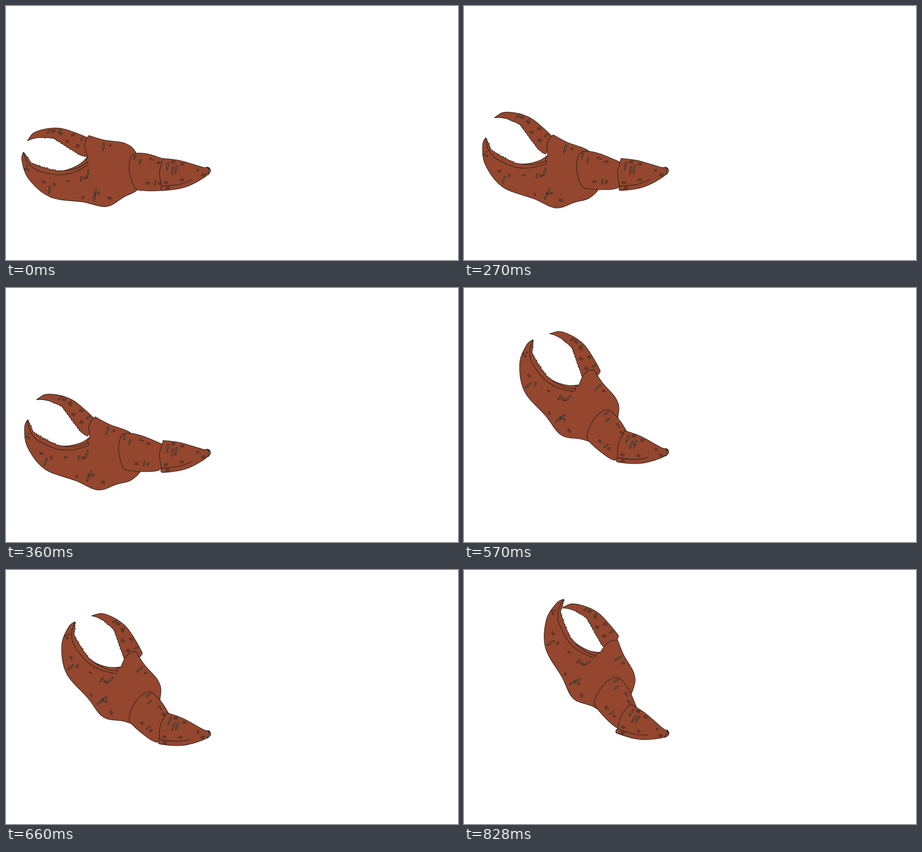
These frames come from a looping animation (998x561 px, 900 ms). An HTML page:

```html
<!DOCTYPE html>
<html lang="en">
<head>
<meta charset="utf-8">
<title>Crab claw</title>
<style>
  html, body { margin: 0; width: 100%; height: 100%; overflow: hidden; background: #fff; }
  svg { display: block; width: 100%; height: 100%; }
  path { fill: none; stroke: #20201c; stroke-width: 1.15; stroke-linejoin: round; stroke-linecap: round; }
  .shell { fill: #94462e; }
  .scar { fill: #8d6a52; }
</style>
</head>
<body>
<svg id="stage" viewBox="0 0 998 561"></svg>
<script>
const LOOP = 900, FIRST_HOLD = 120, HOLD = 150, LAST_POSE = 5;
const FOREARM_TIP = { x: 451.5, y: 364 };

const stage = document.getElementById('stage');
const points = text => text.split(' ').map(p => p.split(',').map(Number));

let seed = 7;
const random = () => (seed = seed * 16807 % 2147483647) / 2147483647;

// Smooth curve through key points; begins with "M" or joins on with "L".
function curve(text, start = 'M') {
  const p = points(text);
  let d = start + p[0];
  for (let i = 0; i < p.length - 1; i++) {
    const [a, b, c, e] = [p[i - 1] || p[i], p[i], p[i + 1], p[i + 2] || p[i + 1]];
    const near = b.map((v, k) => v + (c[k] - a[k]) / 6);
    const far = c.map((v, k) => v - (e[k] - b[k]) / 6);
    d += `C${near} ${far} ${c}`;
  }
  return d;
}
const join = text => curve(text, 'L');

// Saw edge along the key points: each tooth rises slowly and drops steeply.
function teeth(text, perSpan, size) {
  const p = points(text);
  let d = '';
  for (let i = 0; i < p.length - 1; i++) {
    const [[x1, y1], [x2, y2]] = [p[i], p[i + 1]];
    const length = Math.hypot(x2 - x1, y2 - y1);
    for (let k = 0; k < perSpan; k++) {
      const at = k / perSpan, top = at + 0.75 / perSpan, bite = size * (0.4 + random());
      const nx = (y2 - y1) / length * bite, ny = (x1 - x2) / length * bite;
      d += `L${x1 + (x2 - x1) * at} ${y1 + (y2 - y1) * at}` +
        `L${x1 + (x2 - x1) * top + nx} ${y1 + (y2 - y1) * top + ny}`;
    }
  }
  return d;
}

// Teardrop scars, all leaning by dx, dy.
function scars(text, dx, dy) {
  return points(text).map(([x, y]) => {
    const length = Math.hypot(dx, dy), nx = -dy / length * 3, ny = dx / length * 3;
    return `M${x} ${y}c${nx} ${ny} ${dx + nx / 3} ${dy + ny / 3} ${dx} ${dy}` +
      `C${x + dx - nx / 4} ${y + dy - ny / 4} ${x - nx} ${y - ny} ${x} ${y}Z`;
  }).join('');
}
// Little rows of two to four strokes, centred on each point.
function ticks(text, lean) {
  return points(text).map(([x, y]) => {
    const count = 2 + Math.round(random() * 1.6), half = 2 + random() * 1.5;
    let d = '';
    for (let i = 0; i < count; i++) {
      d += `M${x + (i - (count - 1) / 2) * 3 + lean} ${y - half}l${-2 * lean} ${2 * half}`;
    }
    return d;
  }).join('');
}
const rings = (text, r) => points(text).map(([x, y]) =>
  `M${x - r} ${y}a${r} ${r} 0 1 0 ${2 * r} 0a${r} ${r} 0 1 0 ${-2 * r} 0Z`).join('');

// Parts are drawn at rest, back to front. A pose is the place of the anchor and a turn in degrees.
const finger = {
  anchor: [120.7, 292.7],
  poses: '120.7,292.7,0 122.5,286.8,5.8 138,268,20.9 190.2,194,24 250.5,142.3,38 284.2,113.7,28',
  shell: curve('47,298 60,281 80,273 104,269.5 130,272 178,290 187,300 181,333') +
    teeth('181,333 164,329 140,314 114,297 104,291 77,290', 4, 1.4) + join('77,290 60,293 47,298'),
  scars: scars('97,273 121,274 170,290', -5, 8),
  lines: ticks('104,276 122,282 135,299 148,285 158,309', 0.8)
};
const palm = {
  anchor: [160.2, 363.4],
  poses: '160.2,363.4,0 158,371,5.9 159,355.6,11.8 185.4,274.6,24.5 219,224.2,40.4 264.6,185.2,51.7',
  shell: curve('180,333 174,312 176,296 183,286') +
    join('183,286 217,296 262,303 286,322 308,370 291,405 260,422 222,443 170,433 98,422 50,382 35,341 38,323') +
    teeth('38,323 55,347 80,357 110,364', 5, 2.2) + join('110,364 134,362 163,349 180,333'),
  scars: scars('216,302 182,362 97,397 199,403 196,412', -2, 18) +
    rings('166,379 166,385 43,360 49,362', 1.8),
  lines: curve('38,323 47,344 65,361 94,370 122,373 151,367 181,352') +
    curve('131,364 160,357 180,345') + 'M180 333L177 342L182 350' + rings('135,387 139,386 46,353', 0.9) +
    ticks('83,389 106,394 170,423 229,424', -1) + ticks('175,380 205,413 230,308', 0.9)
};
const wrist = {
  anchor: [308.4, 359.4],
  poses: '308.4,359.4,0 283.6,370.6,-9.6 285,356,2.4 312.6,324,24.2 316.8,311,39.8 334.4,279,47',
  shell: curve('366,345 322,329 290,325 276,333 272,362 282,397 300,407.5 362,404 370,375 366,345'),
  scars: scars('285,329 297,339 331,385', -2, 11) + rings('319,338', 2.1),
  lines: ticks('337,346 313,391 339,391', 0.7) + rings('325,340', 1)
};
const forearm = {
  anchor: [FOREARM_TIP.x, FOREARM_TIP.y],
  poses: [0, -8, 0, 12.2, 12.2, 24.3].map(turn => [FOREARM_TIP.x, FOREARM_TIP.y, turn]).join(' '),
  shell: curve('347,336.5 385,341.5 434,356 446,356 451,364 437,379 396,400 350,407.5 342,404 343.5,398') +
    join('343.5,398 339,368 347,336.5'),
  scars: scars('358,345 369,355 377,352', -3, 18) + curve('444,356 452,363 446,373 448,362 444,356'),
  lines: curve('343.5,398 382,394 410,383.5') +
    ticks('369,344 389,349 388,384 357,402 436,373 423,363 353,390', 0.7)
};

const parts = [finger, palm, wrist, forearm].map(part => {
  const group = document.createElementNS('http://www.w3.org/2000/svg', 'g');
  group.innerHTML = `<path class="shell" d="${part.shell}Z"/><path class="scar" d="${part.scars}"/><path d="${part.lines}"/>`;
  stage.append(group);
  return { group, anchor: part.anchor, poses: points(part.poses) };
});

function draw(now) {
  const time = now % LOOP;
  const index = Math.max(0, Math.min(LAST_POSE, 1 + Math.floor((time - FIRST_HOLD) / HOLD)));
  for (const { group, anchor, poses } of parts) {
    const [x, y, turn] = poses[index];
    group.setAttribute('transform', `translate(${x} ${y}) rotate(${turn}) translate(${-anchor[0]} ${-anchor[1]})`);
  }
}

let began;
function tick(now) {
  began ??= now;
  draw(now - began);
  requestAnimationFrame(tick);
}
draw(0);
requestAnimationFrame(tick);
</script>
</body>
</html>
```
